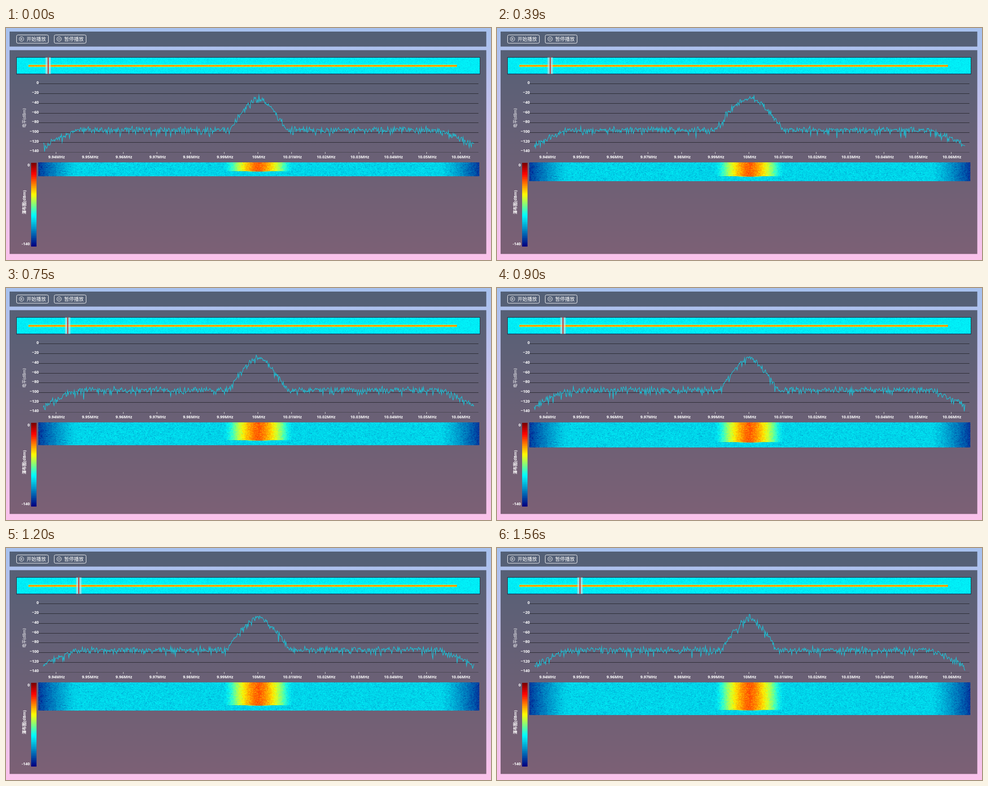
These frames come from a looping animation (1081 by 518 pixels, 1590 ms). An HTML page with a canvas:

```html
<!DOCTYPE html>
<html lang="zh">
<head>
<meta charset="utf-8">
<style>
  html, body { margin: 0; height: 100%; overflow: hidden; }
  canvas { display: block; }
</style>
</head>
<body>
<canvas id="stage" width="1081" height="518"></canvas>
<script>
const W = 1081, H = 518, LOOP = 1590, SLOT = 30;
const POINTS = 640, LAST = 48, HISTORY = 35, ROWS = LAST + HISTORY + 1, ROW_H = 0.875;
const HELD_SLOTS = [14, 16, 33, 40];
const FONT = '"Noto Sans", "Noto Sans CJK SC", "Noto Sans CJK", sans-serif';
const RAMP = [[0, 0, 0, 128], [.375, 0, 255, 255], [.625, 255, 255, 0], [.875, 255, 0, 0], [1, 128, 0, 0]];

let seed = 20;
function rand() {
  seed = (seed + 0x6D2B79F5) | 0;
  let t = Math.imul(seed ^ (seed >>> 15), 1 | seed);
  t = (t + Math.imul(t ^ (t >>> 7), 61 | t)) ^ t;
  return ((t ^ (t >>> 14)) >>> 0) / 4294967296;
}

// Receiver noise in dB: log of two averaged exponential powers
const noise = () => 10 * Math.log10(-Math.log((1 - rand()) * (1 - rand())) / 2);

function rampColor(dBm) {
  const v = Math.min(1, Math.max(0, 1 + dBm / 140));
  const i = Math.max(1, RAMP.findIndex(stop => v <= stop[0]));
  const a = RAMP[i - 1], b = RAMP[i], k = (v - a[0]) / (b[0] - a[0]);
  return [1, 2, 3].map(c => Math.round(a[c] + (b[c] - a[c]) * k));
}

function newCanvas(w, h) {
  return Object.assign(document.createElement('canvas'), { width: w, height: h });
}

function heatmap(w, h, level) {
  const canvas = newCanvas(w, h), g = canvas.getContext('2d'), image = g.createImageData(w, h);
  for (let y = 0, p = 0; y < h; y++)
    for (let x = 0; x < w; x++, p += 4)
      image.data.set([...rampColor(level(x, y)), 255], p);
  g.putImageData(image, 0, 0);
  return canvas;
}

function sweep(row) {
  const ripple = Math.cos(2.224 * row);
  const radius = row === -23 ? 30 : 70 - 7 * ripple;
  return Array.from({ length: POINTS }, (_, i) => {
    const x = i * 960 / (POINTS - 1), edge = Math.min(x, 960 - x), q = Math.abs(x - 479) / radius;
    let level = -94 + noise() * 1.15;
    if (edge < 85) level -= 32 * (1 - edge / 85) ** 1.3;
    if (q < 1 && row >= -23) level += 66 * (1 - q ** (1.5 - .1 * ripple));
    return level;
  });
}

// Newest sweep first
const sweeps = Array.from({ length: ROWS }, (_, j) => sweep(LAST - j));
const waterfall = heatmap(POINTS, ROWS, (x, y) => sweeps[y][x] - 1);

const overview = heatmap(1032, 38, (x, y) => {
  const jitter = noise() * .6, dy = Math.abs(y - 19);
  if (x > 25 && x < 981 && dy < 3) return -26 - 16 * dy + jitter;
  return (y % 37 === 0 ? -112 : y % 35 === 1 ? -99 : -90.5) + jitter;
});

const levelY = dBm => 124.5 - dBm * 1.0893;

function text(g, str, x, y, align = 'center', weight = 600, size = 8.8) {
  g.font = `${weight} ${size}px ${FONT}`;
  g.textAlign = align;
  g.fillStyle = '#fff';
  g.fillText(str, x, y);
}

function verticalText(g, str, x, y, weight) {
  g.save();
  g.translate(x, y);
  g.rotate(-Math.PI / 2);
  text(g, str, 0, 0, 'center', weight, 9);
  g.restore();
}

function line(g, x1, y1, x2, y2, color) {
  g.strokeStyle = color;
  g.beginPath();
  g.moveTo(x1, y1);
  g.lineTo(x2, y2);
  g.stroke();
}

function button(g, x, label, icon) {
  g.strokeStyle = '#fff';
  g.lineWidth = 1;
  g.beginPath();
  g.roundRect(x, 15.5, 71, 18.5, 3);
  g.stroke();
  g.beginPath();
  g.arc(x + 11, 24.5, 5, 0, 7);
  g.stroke();
  g.lineWidth = .9;
  g.stroke(new Path2D(`M${x + 11} 24.5 ${icon}`));
  g.lineWidth = 1;
  text(g, label, x + 22.3, 28.6, 'left', 500, 10.8);
}

function drawBackdrop() {
  const canvas = newCanvas(W, H), g = canvas.getContext('2d');
  const sky = g.createLinearGradient(0, 0, 0, H);
  sky.addColorStop(0, '#a6c1ee');
  sky.addColorStop(1, '#fbc2eb');
  g.fillStyle = sky;
  g.fillRect(0, 0, W, H);
  g.fillStyle = 'rgba(0,0,0,.5)';
  g.fillRect(8, 8, 1062.5, 33.5);
  g.fillRect(8, 49.5, 1062.5, 455);

  button(g, 23.5, '开始播放', 'm-1.5 -2.3 l3.6 2.3 l-3.6 2.3 z');
  button(g, 107.5, '暂停播放', 'm-1.5 -2.3 v4.6 m3 0 v-4.6');

  g.drawImage(overview, 24, 65);
  g.strokeStyle = '#1c2b38';
  g.strokeRect(23.5, 65.5, 1033, 37.5);

  for (let i = 0; i < 8; i++) {
    const y = Math.round(124 + 21.857 * i) + .5;
    line(g, 73, y, 1053, y, i < 7 ? '#26262c' : '#48454f');
    text(g, i ? '−' + 20 * i : '0', 73, 125.4 + 21.7 * i, 'right');
  }
  for (let i = 0; i < 13; i++) {
    const x = 112 + 75.1 * i, tick = Math.floor(x) - .5;
    line(g, tick, 277, tick, 281, '#ddd');
    text(g, +(9.94 + i / 100).toFixed(2) + 'MHz', x + .6, 291.3);
  }
  verticalText(g, '电平(dBm)', 43.5, 201, 500);

  for (let y = 301; y < 488; y += 4) {
    g.fillStyle = `rgb(${rampColor(-140 * (y - 301) / 184)})`;
    g.fillRect(56, y, 12, Math.min(4, 488 - y));
  }
  text(g, '0', 53, 309.3, 'right', 700);
  text(g, '-140', 53, 484.8, 'right', 700);
  verticalText(g, '瀑布图(dBm)', 43.5, 389, 700);
  return canvas;
}

const backdrop = drawBackdrop();
const ctx = document.getElementById('stage').getContext('2d');

function drawCursor(x) {
  ctx.fillStyle = 'rgba(222,222,222,.6)';
  ctx.fillRect(x - 6, 65.5, 12, 37);
  ctx.fillStyle = '#d80808';
  ctx.fillRect(x - .9, 65.5, 1.8, 37);
}

function drawTrace(levels) {
  ctx.strokeStyle = '#14cbe0';
  ctx.lineWidth = 1.1;
  ctx.beginPath();
  levels.forEach((level, i) => ctx.lineTo(83 + i * 960 / (POINTS - 1), Math.min(276, levelY(level))));
  ctx.stroke();
}

function frame(now) {
  const slot = Math.floor(now % LOOP / SLOT);
  const step = slot - HELD_SLOTS.filter(held => held <= slot).length;
  const newest = LAST - step, rows = ROWS - newest;
  ctx.drawImage(backdrop, 0, 0);
  drawCursor(94 + step * 91 / LAST);
  drawTrace(sweeps[newest]);
  ctx.drawImage(waterfall, 0, newest, POINTS, rows, 72, 299.5, 983, rows * ROW_H);
  requestAnimationFrame(frame);
}
requestAnimationFrame(frame);
</script>
</body>
</html>
```
